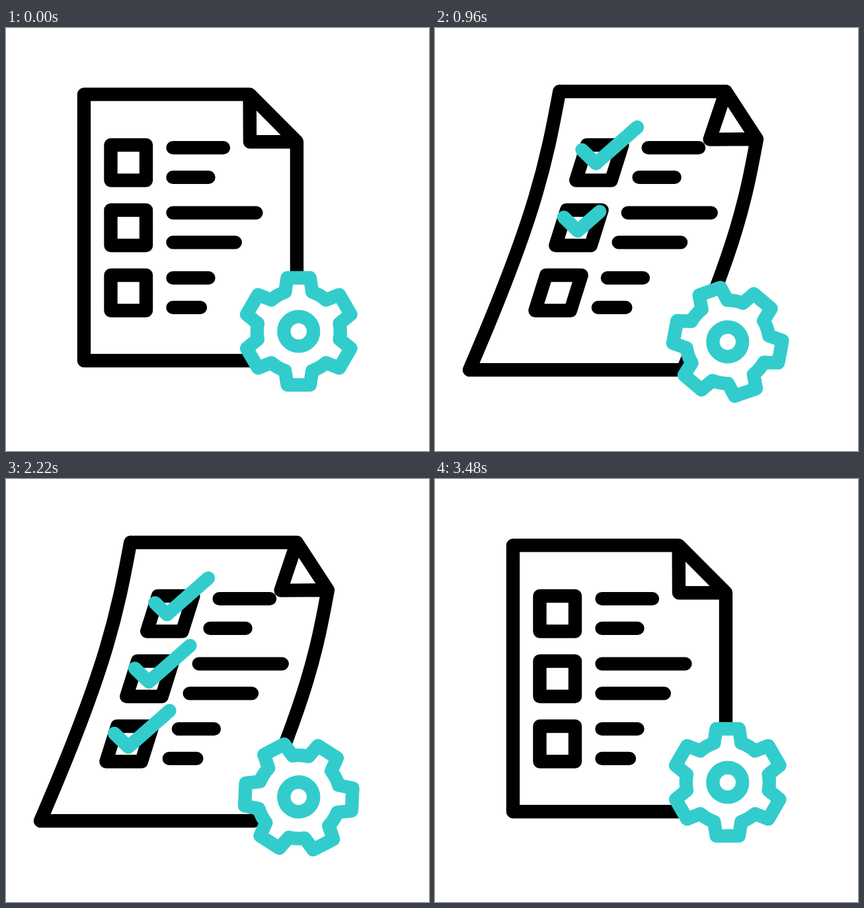
Write an HTML page that moves like this. It is 640x640 px and loops after 3.6 s.

```html
<!DOCTYPE html>
<html lang="en">
<head>
<meta charset="utf-8">
<title>Checklist</title>
<style>
  html, body { margin: 0; width: 100%; height: 100%; overflow: hidden; background: #fff; }
  svg { display: block; width: 100vw; height: 100vh; }
  path, circle { fill: none; stroke-width: 20.4; stroke-linecap: round; stroke-linejoin: round; }
  #page path { stroke: #000; }
  #ticks path, #gear path, #gear circle { stroke: #33cccc; }
  #gear path { fill: #fff; }
</style>
</head>
<body>
<svg viewBox="0 0 640 640">
  <g id="page"><path id="sheet"/><path id="rows"/></g>
  <g id="ticks"><path pathLength="1"/><path pathLength="1"/><path pathLength="1"/></g>
  <g id="gear"><path id="cog"/><circle r="22.4"/></g>
</svg>
<script>
const LOOP = 3600;
const ROW = 98.5;
const $ = id => document.getElementById(id);
const mix = (a, b, k) => a.map((v, i) => v + (b[i] - v) * k);
const ease = (t, from, to) => {
  const u = Math.min(1, Math.max(0, (t - from) / (to - from)));
  return u * u * (3 - 2 * u);
};

// Sheet edge from top to bottom; straight while both ends share x
function side(top, bottom) {
  const at = (fx, fy) => [
    top[0] + (bottom[0] - top[0]) * fx,
    top[1] + (bottom[1] - top[1]) * fy
  ];
  return `M${top}C${at(0.15, 0.26)} ${at(0.265, 0.45)} ${bottom}`;
}

function drawSheet(k) {
  const topLeft = mix([118, 100.4], [188.3, 96], k);
  const cut = mix([368.7, 100.4], [440, 96], k);
  const fold = mix([369, 172.3], [415.7, 168.6], k);
  const topRight = mix([440, 172], [487, 168], k);
  const bottomRight = mix([440, 503.2], [375, 517.3], k);
  const bottomLeft = mix([118, 503.2], [52, 517.3], k);
  $("sheet").setAttribute("d",
    side(topLeft, bottomLeft) + `L${bottomRight}` +
    side(topRight, bottomRight) +
    `M${topLeft}L${cut}L${topRight}L${fold}L${cut}`);
}

function drawRows(k) {
  const lean = (x, y) => [x + 0.3134 * (405 - y) * k, y];
  const line = (y, length) => `M${lean(252.5, y)}L${lean(252.5 + length, y)}`;
  const box = (x, y, s) =>
    `M${lean(x, y)}L${lean(x + s, y)}L${lean(x + s, y + s)}L${lean(x, y + s)}Z`;
  const d = [[76.5, 54], [126, 94.3], [54, 41.5]].map(([upper, lower], i) => {
    const y = 177 + ROW * i;
    return box(158.5, y, 53.5) + line(y + 4.1, upper) + line(y + 48.9, lower);
  });
  $("rows").setAttribute("d", d.join(""));
}

const ticks = [...$("ticks").children];
const tickStarts = [[222.5, 184.5], [195, 286.5], [164, 385]];
ticks.forEach((el, i) => el.setAttribute("d", `M${tickStarts[i]}l21 20.5 62.5 -55`));

function drawTick(el, i, t) {
  const drawAt = 300 + 480 * i, eraseAt = 2180 + 150 * i;
  const start = ease(t, eraseAt, eraseAt + 360);
  const length = ease(t, drawAt, drawAt + 300) - start;
  el.style.display = length > 0.001 ? "" : "none";
  el.setAttribute("stroke-dasharray", `${length} 3`);
  el.setAttribute("stroke-dashoffset", -start);
}

function cogPath() {
  const at = (deg, r) => {
    const a = deg * Math.PI / 180;
    return [r * Math.sin(a), -r * Math.cos(a)];
  };
  let d = `M${at(-19, 63)}`;
  for (let a = 0; a < 360; a += 60) {
    d += `L${at(a - 12, 82.8)}L${at(a + 12, 82.8)}L${at(a + 19, 63)}A63 63 0 0 1 ${at(a + 41, 63)}`;
  }
  return d + "Z";
}

function draw(t) {
  const curl = ease(t, 0, 500) - ease(t, 2785, 3245);
  drawSheet(curl);
  drawRows(curl);
  ticks.forEach((el, i) => drawTick(el, i, t));
  const y = 459 + 31 * (ease(t, 217, 1683) - ease(t, 1780, 3020));
  const turn = 180 * (ease(t, 20, 1765) + ease(t, 1775, 3415));
  $("gear").setAttribute("transform", `translate(442.8 ${y}) rotate(${turn})`);
}

$("cog").setAttribute("d", cogPath());
const begin = performance.now();
function frame(now) {
  draw(Math.max(0, now - begin) % LOOP);
  requestAnimationFrame(frame);
}
draw(0);
requestAnimationFrame(frame);
</script>
</body>
</html>
```
